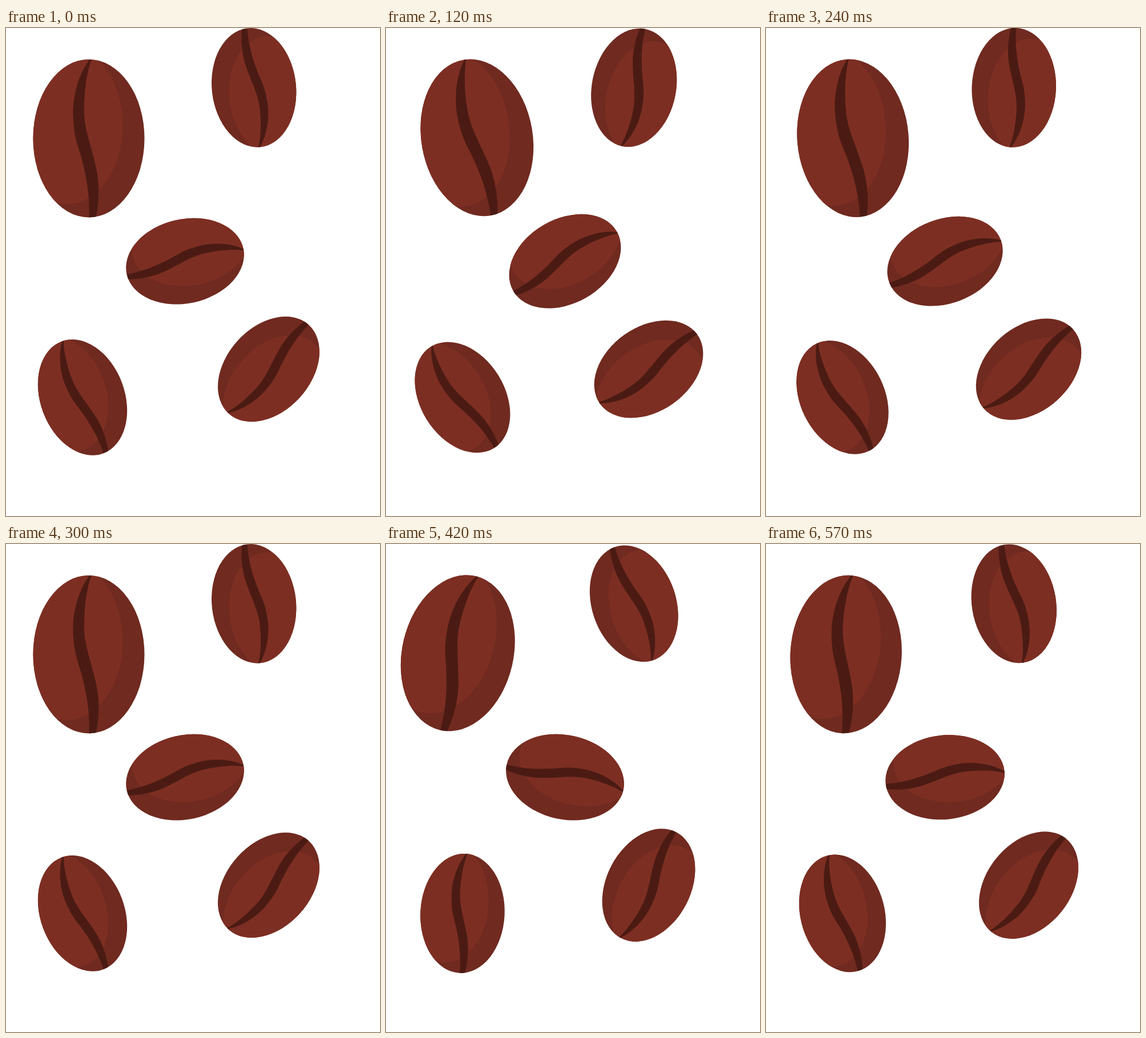
An HTML page that plays this animation: 655 by 854 pixels, repeating every 0.6 s.

```html
<!DOCTYPE html>
<html lang="en">
<head>
<meta charset="utf-8">
<title>Coffee beans</title>
<style>
  html, body { margin: 0; width: 100%; height: 100%; overflow: hidden; background: #fff; }
  svg { display: block; width: 100%; height: 100%; }
</style>
</head>
<body>
<svg id="stage" viewBox="0 0 655 854">
  <defs>
    <clipPath id="outline"><ellipse rx="97.5" ry="138.3"/></clipPath>
    <g id="bean">
      <ellipse rx="97.5" ry="138.3" fill="#702a20"/>
      <g clip-path="url(#outline)">
        <ellipse cx="-38" cy="-23" rx="97.5" ry="138.3" fill="#7d2e22"/>
        <path transform="translate(-145 -193.2)" fill="#4b1b13"
          d="M147 54C127 80 116 120 117.5 155C119 190 125 203 130 220C140 255 147 290 145.5 332
             L157.5 332C163 305 164.5 275 158 245C150 208 138 180 137 150C136 115 141 78 150 54Z"/>
      </g>
    </g>
  </defs>
</svg>
<script>
const LOOP = 600, STEP = 30, SMALL = 0.756;

// rest: resting angle; swing: peak offsets of the first and second half loop;
// lift: distance of the pivot above the bean's centre
const beans = [
  { x: 145, y: 193.2, scale: 1, rest: 0, swing: [-12.2, 16.3], lift: 85 },
  { x: 434.2, y: 104.3, scale: SMALL, rest: 173.7, swing: [21.7, -15.3], lift: 0 },
  { x: 313.5, y: 408.2, scale: SMALL, rest: 77.6, swing: [-21.6, 31], lift: 0 },
  { x: 134, y: 646.4, scale: SMALL, rest: -20.4, swing: [-14.3, 29.2], lift: 0 },
  { x: 460, y: 597, scale: SMALL, rest: 222.2, swing: [15.6, -18.1], lift: 0 }
];

const stage = document.getElementById("stage");
for (const bean of beans) {
  bean.node = document.createElementNS("http://www.w3.org/2000/svg", "use");
  bean.node.setAttribute("href", "#bean");
  stage.append(bean.node);
}

function draw(ms) {
  const phase = Math.floor((ms % LOOP) / STEP) * STEP / LOOP * 2;
  const half = Math.floor(phase);
  const amount = 1 - Math.abs((phase - half) * 2 - 1);
  for (const { node, x, y, scale, rest, swing, lift } of beans) {
    const angle = rest + swing[half] * amount;
    node.setAttribute("transform",
      `translate(${x} ${y}) rotate(${angle} 0 ${-lift}) scale(${scale})`);
  }
}

function tick() {
  draw(performance.now());
  requestAnimationFrame(tick);
}
tick();
</script>
</body>
</html>
```
